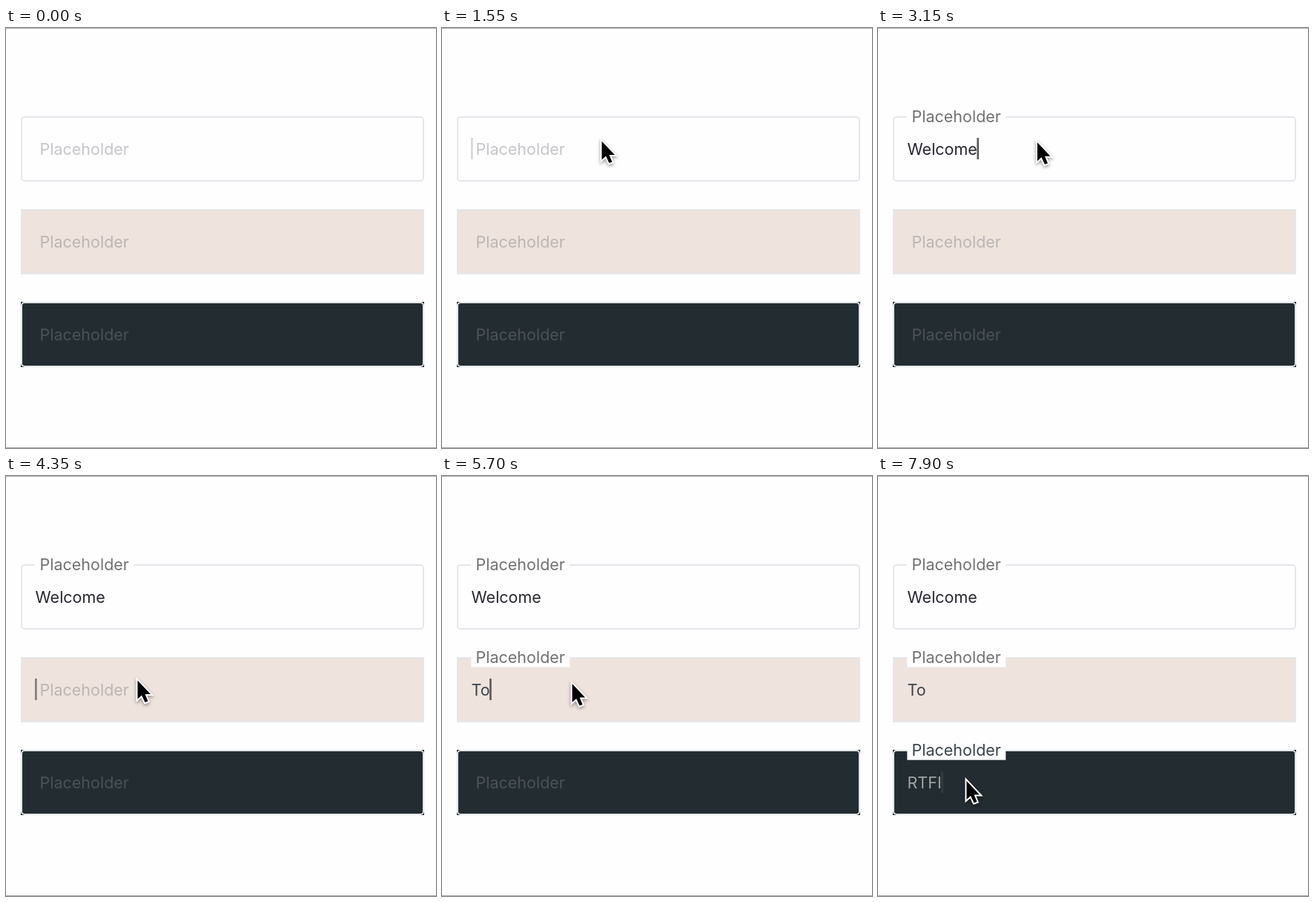
Animation of 580 by 566 pixels, one loop 8000 ms. Source, as an HTML page with a canvas:

```html
<!DOCTYPE html>
<html lang="en">
<head>
<meta charset="utf-8">
<title>Floating labels</title>
<style>
  html, body { margin: 0; width: 100%; height: 100%; overflow: hidden; background: #fefefe; }
  canvas { display: block; }
</style>
</head>
<body>
<canvas id="stage" width="580" height="566"></canvas>
<script>
const ctx = document.getElementById('stage').getContext('2d');
const LOOP = 8000;
const LABEL_FADE = 350;
const BLINK = 700;
const PAPER = '#fefefe';

// The pointer sets off at `depart`, rests at `rest`, and the field has focus from `focus`.
const light = { border: '#e5e6eb', label: '#717173', caret: '#5c5c60' };
const fields = [
  { ...light, fill: PAPER, radius: 4, hint: '#c5c6ca', ink: '#26262f',
    text: 'Welcome', depart: 50, focus: 900, typing: 1750, span: 1100, rest: [215.5, 152.5] },
  { ...light, fill: '#eee3dd', radius: 0, hint: '#bab5b4', ink: '#3a434b',
    text: 'To', depart: 3100, focus: 3800, typing: 4500, span: 500, rest: [177.5, 275.5] },
  { fill: '#232c31', radius: 4, border: '#e1e4e6', hint: '#4c5256', label: '#3a444b',
    ink: '#a0a3a5', caret: '#343d43',
    text: 'RTFI', depart: 7000 - 1350, focus: 6150, typing: 7000, span: 900, rest: [119.5, 411] }
];
const entry = [290, 500];

const arrow = new Path2D('M0 0V25L5.5 20L10 29.5L14 28L10 18.5H17.5Z');
const clamp = v => Math.max(0, Math.min(1, v));
const mix = (a, b, k) => a + (b - a) * k;
const ease = k => k < 0.5 ? 2 * k * k : 1 - 2 * (1 - k) ** 2;

// Typing slows down: letter i lands at a quadratic share of the span.
const keyTime = (f, i) => f.typing + f.span * (i / (f.text.length - 1)) ** 2;

function caretAlpha(f, next, count, t) {
  const blur = next ? next.depart + 450 : LOOP;
  if (t < f.focus || t >= blur) return 0;
  const age = t - (count ? keyTime(f, count - 1) : f.focus);
  return clamp((BLINK - age % BLINK) / 200);
}

function write(text, x, y, color) {
  ctx.fillStyle = color;
  ctx.fillText(text, x, y);
}

function drawField(f, index, t) {
  const y = 120 + 125 * index;
  const baseline = y + 51;
  const count = [...f.text].filter((_, i) => keyTime(f, i) <= t).length;
  const typed = f.text.slice(0, count);

  ctx.fillStyle = f.fill;
  ctx.fillRect(20, y - 1, 544, 88);
  ctx.strokeStyle = f.border;
  ctx.lineWidth = 2;
  ctx.beginPath();
  ctx.roundRect(21, y, 542, 86, f.radius);
  ctx.stroke();

  if (typed) write(typed, 39.5, baseline, f.ink);
  else write('Placeholder', 45.5, baseline, f.hint);

  ctx.globalAlpha = clamp((t - f.typing) / LABEL_FADE);
  ctx.fillStyle = PAPER;
  ctx.fillRect(39.3, y - 13, 133, 25.7);
  write('Placeholder', 45.5, y + 7, f.label);

  ctx.globalAlpha = caretAlpha(f, fields[index + 1], count, t);
  ctx.fillStyle = f.caret;
  ctx.fillRect(39 + ctx.measureText(typed).width, y + 28, 2.7, 29);
  ctx.globalAlpha = 1;
}

function drawPointer(t) {
  const index = fields.filter(f => f.depart <= t).length - 1;
  if (index < 0) return;
  const { depart, focus, rest } = fields[index];
  const from = index ? fields[index - 1].rest : entry;
  const k = ease(clamp((t - depart) / (focus - 100 - depart)));
  ctx.save();
  ctx.translate(mix(from[0], rest[0], k), mix(from[1], rest[1], k));
  ctx.save();
  ctx.shadowColor = 'rgba(0, 0, 0, 0.4)';
  ctx.shadowBlur = 4;
  ctx.shadowOffsetY = 2;
  ctx.strokeStyle = '#fff';
  ctx.lineWidth = 4;
  ctx.stroke(arrow);
  ctx.restore();
  ctx.fillStyle = '#000';
  ctx.fill(arrow);
  ctx.restore();
}

function draw(now) {
  const t = now % LOOP;
  ctx.fillStyle = PAPER;
  ctx.fillRect(0, 0, 580, 566);
  ctx.fillStyle = '#aaa';
  ctx.fillRect(0, 0, 580, 1);
  ctx.fillRect(0, 565, 580, 1);
  ctx.font = '21.5px Inter, sans-serif';
  fields.forEach((f, i) => drawField(f, i, t));
  drawPointer(t);
  requestAnimationFrame(draw);
}
requestAnimationFrame(draw);
</script>
</body>
</html>
```
